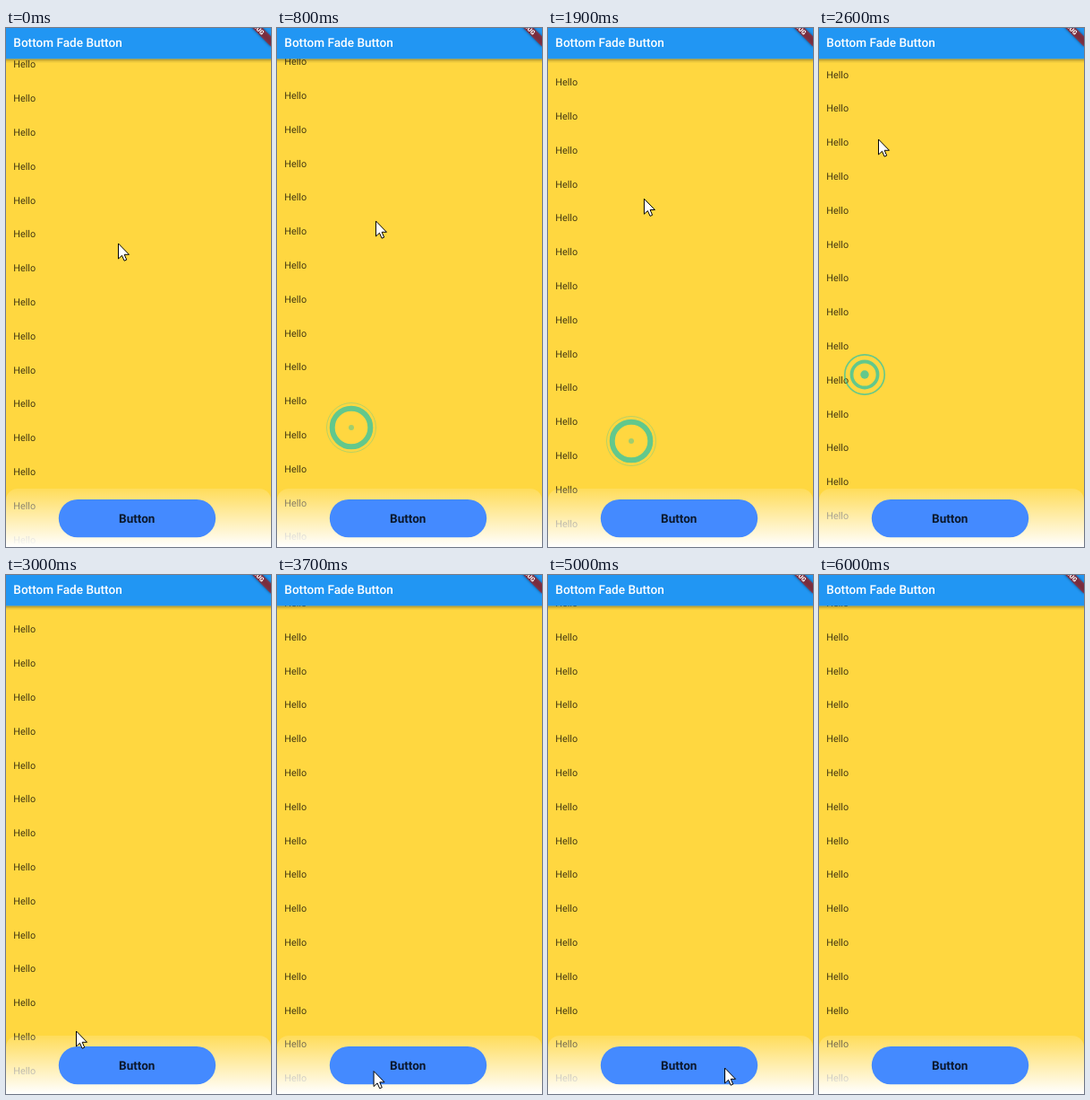
Recreate the animation shown at these times as an HTML page. Size 296x578 px, loop 8000 ms.

```html
<!DOCTYPE html>
<html lang="en">
<head>
<meta charset="utf-8">
<title>Bottom Fade Button</title>
<style>
  html, body { margin: 0; width: 100%; height: 100%; overflow: hidden; background: #ffd740; }
  svg { display: block; width: 100vw; height: 100vh; font-family: Roboto, sans-serif; text-rendering: geometricPrecision; }
</style>
</head>
<body>
<svg viewBox="0 0 296 578" preserveAspectRatio="none">
  <defs>
    <linearGradient id="fade" x2="0" y2="1">
      <stop offset="0" stop-color="#fff" stop-opacity=".14"/>
      <stop offset="1" stop-color="#fff"/>
    </linearGradient>
    <linearGradient id="shade" x2="0" y2="1">
      <stop offset="0" stop-opacity=".34"/>
      <stop offset=".5" stop-opacity=".1"/>
      <stop offset="1" stop-opacity="0"/>
    </linearGradient>
    <filter id="blur" x="-20%" y="-100%" width="140%" height="300%">
      <feGaussianBlur stdDeviation="1.6"/>
    </filter>
  </defs>

  <rect width="296" height="578" fill="#ffd740"/>
  <g id="rows" font-size="10.8" fill="#000" fill-opacity=".75"></g>

  <path d="M0 578V526a13 13 0 0 1 13-13H283a13 13 0 0 1 13 13V578Z" fill="url(#fade)"/>
  <rect x="58.8" y="524.9" width="175.4" height="42.4" rx="21.2" fill="#448aff"/>
  <text x="146.2" y="551.2" font-size="13.5" font-weight="700" text-anchor="middle" fill="#000" fill-opacity=".83">Button</text>

  <rect y="34.4" width="296" height="5" fill="url(#shade)"/>
  <rect width="296" height="34.4" fill="#2196f3"/>
  <text x="8.3" y="21" font-size="13.6" font-weight="500" fill="#fff">Bottom Fade Button</text>

  <g transform="translate(279.5 -1.5) rotate(45)">
    <rect x="-27" y="-4" width="54" height="8.1" fill-opacity=".5" filter="url(#blur)"/>
    <rect x="-27" y="-4" width="54" height="8.1" fill="#b71c1c" fill-opacity=".63"/>
    <text y="2.5" font-size="6.9" font-weight="900" text-anchor="middle" fill="#fff">DEBUG</text>
  </g>

  <g id="ring" fill="none" stroke="#0ec0b5" stroke-opacity=".65">
    <circle id="outer"/>
    <circle id="band"/>
    <circle id="dot" fill="#0ec0b5" fill-opacity=".65" stroke="none"/>
  </g>
  <path id="cursor" d="M0 0V17L4 13.3L6.6 19.2L9.2 18.1L6.7 12.3H12Z" fill="#fff" stroke="#000" stroke-linejoin="round"/>
</svg>

<script>
const LOOP = 8000, STEP = 100, ROW = 37.8, LIST_START = 40.5;

// upward drags: press time, release time, press point, travel
const drags = [
  { t: 400, end: 900, x: 83, y: 445, dx: 28.6, dy: -239.6 },
  { t: 1500, end: 2000, x: 93, y: 460, dx: 15, dy: -281 },
  { t: 2300, end: 2700, x: 51, y: 386, dx: 16.5, dy: -279.5 }
];
const fling = { t: 2700, end: 3470, dy: -78.6 };
const click = { t: 4000, x: 111, y: 557 };

// pointer stops: time, x, y
const stops = [
  [0, 125.5, 240],
  ...drags.flatMap(d => [[d.t, d.x, d.y], [d.end, d.x + d.dx, d.y + d.dy]]),
  [3000, 78.5, 508],
  [click.t, click.x, click.y],
  [4700, click.x, click.y],
  [5200, 214, 547.5]
];

const el = id => document.getElementById(id);
const set = (node, attrs) => {
  for (const k in attrs) node.setAttribute(k, attrs[k]);
};
const clamp = v => Math.max(0, Math.min(1, v));
const ease = (t, from, to) => 1 - (1 - clamp((t - from) / (to - from))) ** 2;

for (let i = 0; i < 16; i++) {
  const row = document.createElementNS('http://www.w3.org/2000/svg', 'text');
  set(row, { x: 8.3, y: i * ROW });
  row.textContent = 'Hello';
  el('rows').append(row);
}

function drawRows(t) {
  const pos = [...drags, fling].reduce((sum, m) => sum + m.dy * ease(t, m.t, m.end), LIST_START);
  const top = (pos % ROW + ROW) % ROW;
  set(el('rows'), { transform: `translate(0 ${top + 3.9})` });
}

function drawCursor(t) {
  const i = stops.findIndex(s => s[0] > t);
  const b = stops.at(i), a = i < 0 ? b : stops[i - 1];
  const u = a === b ? 1 : ease(t, a[0], b[0]);
  const [x, y] = [1, 2].map(n => a[n] + (b[n] - a[n]) * u);
  set(el('cursor'), {
    transform: `translate(${x} ${y})`,
    visibility: t < 6000 ? 'visible' : 'hidden'
  });
}

// the ring grows for 400 ms, then fades out
function drawRing(t) {
  const tap = [...drags, click].find(p => t >= p.t && t < p.t + 600);
  set(el('ring'), { visibility: tap ? 'visible' : 'hidden' });
  if (!tap) return;
  const age = t - tap.t;
  const g = clamp((age + 1) / 400), rest = 1 - g;
  set(el('ring'), {
    transform: `translate(${tap.x} ${tap.y})`,
    opacity: clamp((600 - age) / 200)
  });
  set(el('outer'), {
    r: 27.5 * g ** 0.75,
    'stroke-width': Math.min(1.7, 1 + 3 * rest),
    opacity: clamp(0.45 + 2 * rest)
  });
  set(el('band'), { r: 21.3 * g ** 1.35, 'stroke-width': 6 * g ** 1.6 });
  set(el('dot'), { r: Math.min(6, 3 + 7 * rest), opacity: clamp(0.6 + 1.6 * rest) });
}

const begin = performance.now();
function tick() {
  const t = Math.floor((performance.now() - begin) % LOOP / STEP) * STEP;
  drawRows(t);
  drawCursor(t);
  drawRing(t);
  requestAnimationFrame(tick);
}
tick();
</script>
</body>
</html>
```
